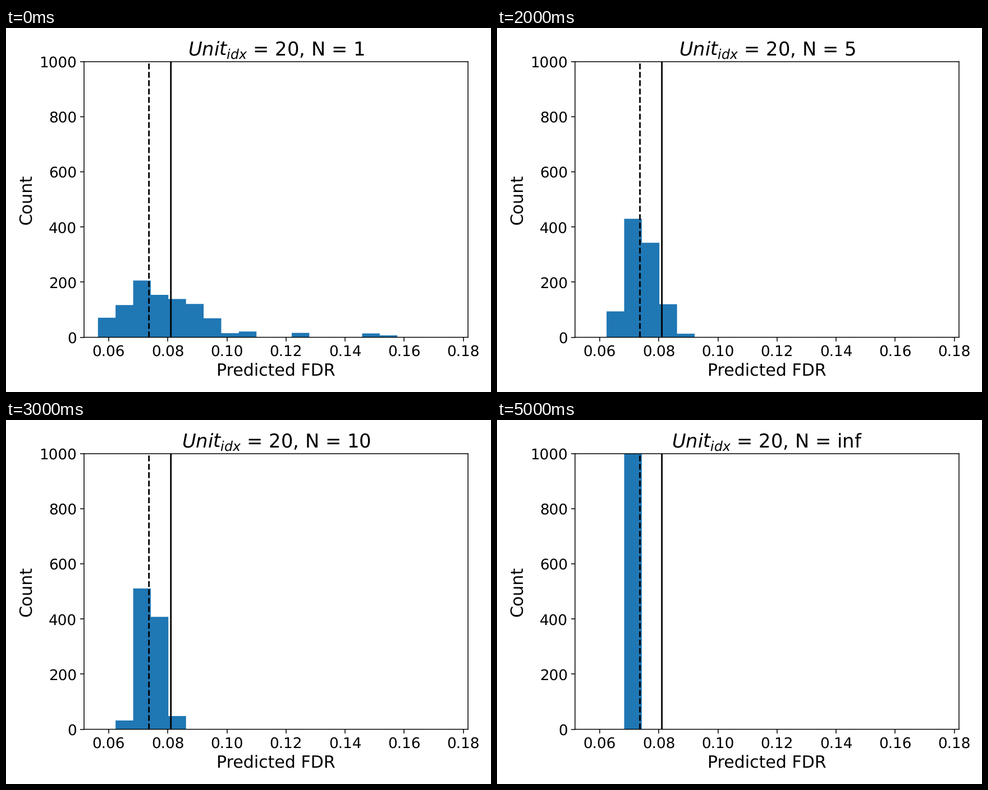
A matplotlib script for the animation above (6000 ms loop, 864x648 px).

```python
import numpy as np
import matplotlib.pyplot as plt
from matplotlib.animation import FuncAnimation

W, H, DPI = 864, 648, 135
LEFT, RIGHT, TOP, BOTTOM = 139, 823, 60, 550.6  # axes box in pixels

BINS = 20
START, STEP = 0.05637, 0.00596
PREDICTED, MEAN = 0.07363, 0.08105

# (sample size, counts per bin from the left)
STAGES = [
    ("1", [71, 117, 206, 154, 139, 121, 69, 15, 21, 0, 0, 16, 0, 0, 0, 14, 7]),
    ("2", [28, 130, 279, 254, 154, 90, 27, 22, 6, 0, 2, 0, 1]),
    ("5", [0, 94, 430, 343, 120, 13]),
    ("10", [0, 32, 511, 408, 48, 1]),
    ("20", [0, 4, 605, 387, 4]),
    ("inf", [0, 0, 1000]),
]

# smooth sub-pixel lines and unhinted glyphs
plt.rcParams.update({"font.family": "DejaVu Sans", "path.snap": False,
                     "text.hinting": "none"})

fig = plt.figure(figsize=(W / DPI, H / DPI), dpi=DPI, facecolor="white")
ax = fig.add_axes([LEFT / W, 1 - BOTTOM / H,
                   (RIGHT - LEFT) / W, (BOTTOM - TOP) / H])

edges = START + STEP * np.arange(BINS + 1)
hist = ax.stairs(np.zeros(BINS), edges, fill=True, color="tab:blue")
ax.axvline(PREDICTED, color="k", ls="--", lw=1.5)
ax.axvline(MEAN, color="k", lw=1.5)

ax.set_xlim(0.051662, 0.181576)
ax.set_ylim(0, 1000)
ax.set_xticks(np.arange(6, 19, 2) / 100)
ax.xaxis.set_major_formatter("{x:.2f}")
ax.tick_params(labelsize=14)
ax.set_xlabel("Predicted FDR", fontsize=16)
ax.set_ylabel("Count", fontsize=16)
title = ax.set_title("", fontsize=18)


def draw(i):
    size, counts = STAGES[i]
    hist.set_data(counts + [0] * (BINS - len(counts)))
    title.set_text(f"$Unit_{{idx}}$ = 20, N = {size}")
    return [hist, title]


anim = FuncAnimation(fig, draw, frames=len(STAGES), interval=1000,
                     init_func=lambda: draw(0), repeat=True, repeat_delay=0)
plt.show()
```
